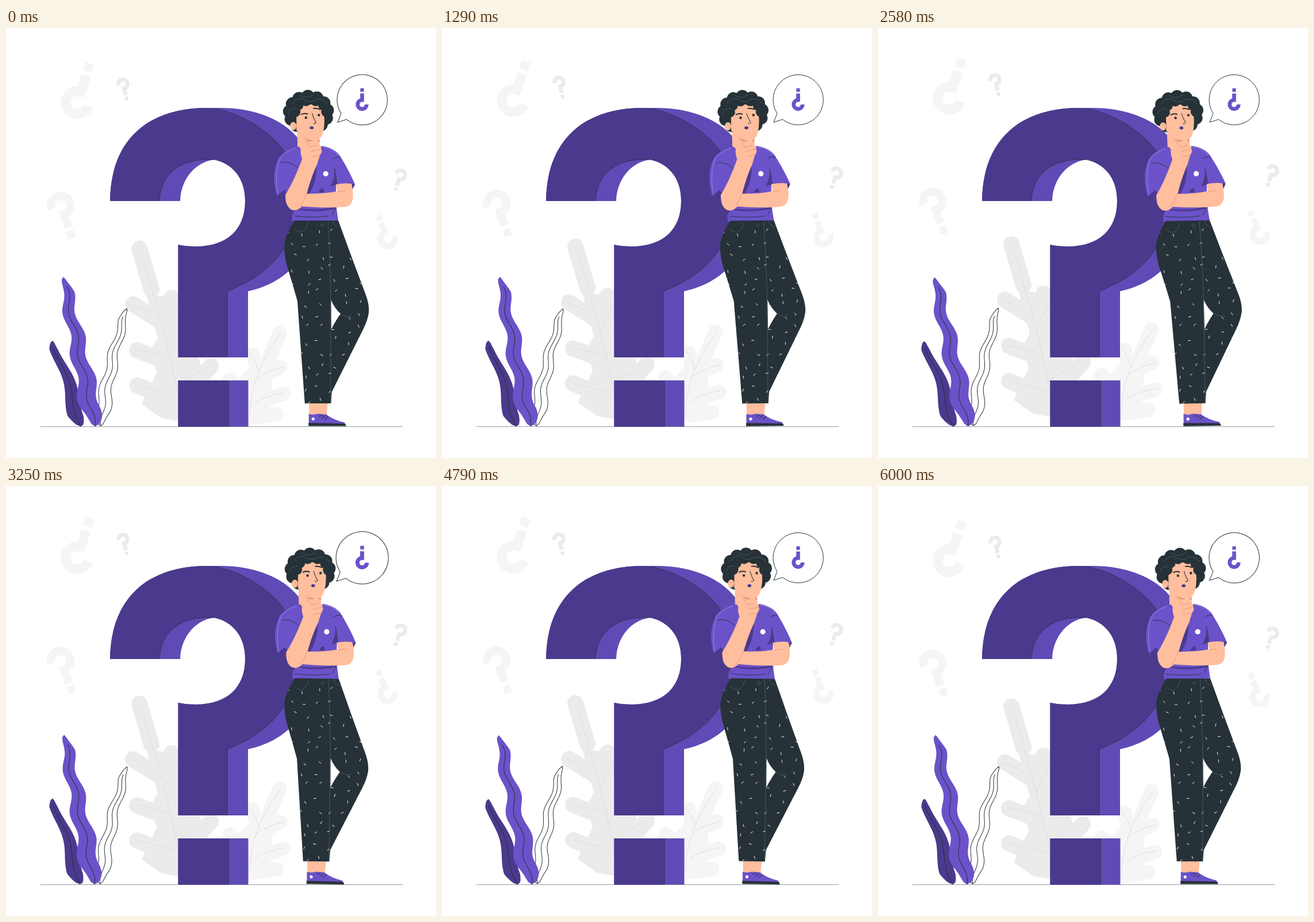
An HTML page that plays this animation: 748x748 px, repeating every 6040 ms.

```html
<!DOCTYPE html>
<html lang="en">
<head>
<meta charset="utf-8">
<title>Thinking</title>
<style>
html, body { margin: 0; width: 100%; height: 100%; overflow: hidden; background: #fff; }
svg { display: block; width: 100vw; height: 100vh; }
.main { fill: #6b52c9; }
.deep { fill: #4b398d; }
.side { fill: #604ab5; }
.ink { fill: #263238; }
.skin { fill: #ffbe9d; }
.line { fill: none; stroke: #263238; }
.crease { fill: none; stroke: #e58f70; stroke-width: .8; }
.seam { fill: none; stroke: #4a5c66; stroke-width: .9; }
.vein { fill: none; stroke: #dedede; }
.pale { fill: #f5f5f5; color: #f5f5f5; }
.grey { fill: #ebebeb; color: #ebebeb; }
.lobes { stroke: currentColor; stroke-linecap: round; }
.outline { fill: #fff; stroke: #263238; }
</style>
</head>
<body>
<svg viewBox="0 0 748 748">
<defs>
  <g id="ask">
    <path d="M-20,0A20,20 0 1 1 0,20V49" fill="none" stroke="currentColor" stroke-width="17"/>
    <path d="M-8,56.5H8V72H-8Z" fill="currentColor"/>
  </g>
  <clipPath id="cloth"><use href="#trousers" clip-rule="evenodd"/></clipPath>
</defs>

<g id="floating">
  <!-- lobed leaves: a body with thick rounded strokes -->
  <g class="grey">
    <path d="M238,440L260,466L300,470L340,590L310,686L270,679L236,655L262,600L252,560L264,540Z"/>
    <path class="lobes" stroke-width="28" d="M232,384L253,455M221,481L272,513M288,470L280,540M228,561L290,585M228,622L300,652M356,589L310,640"/>
  </g>
  <path class="vein" d="M239,405Q262,480 276,535T302,650M218,482Q250,492 266,508M300,487Q284,505 276,535M225,560Q262,565 288,578M230,622Q270,632 296,640M355,588L296,622"/>
  <g class="pale">
    <path d="M441,573L465,571L463,612L458,684L420,691L385,632L415,600Z"/>
    <path class="lobes" stroke-width="25" d="M476,532L455,580M477,590L440,608M482,637L440,650M470,672L432,678M429,568L438,600M389,612L425,645"/>
  </g>
  <path class="vein" d="M478,532Q450,570 437,605T424,675M424,565Q438,585 439,598M483,590Q455,596 436,610M484,635Q450,640 430,655"/>
  <g class="pale">
    <use href="#ask" transform="translate(124,130) rotate(198)"/>
    <use href="#ask" transform="translate(95,309) rotate(-20) scale(.84)"/>
    <use href="#ask" transform="translate(664,367.5) rotate(158) scale(.62)"/>
  </g>
  <g class="grey">
    <use href="#ask" transform="translate(203.5,98) rotate(-14) scale(.4)"/>
    <use href="#ask" transform="translate(686.5,256) rotate(19) scale(.4)"/>
  </g>
</g>

<path d="M60,693.5H690" stroke="#263238" stroke-width=".8" opacity=".6"/>

<!-- large question mark -->
<path class="side" d="M181,301C182,196 245,139 350,139L375,139C425,139 475,155 504,187C532,215 540,270 535,310C535,400 485,444 421,458V573H299.500V377C308,379 318,380 330,380C385,380 416,350 416,301C416,262 395,236 362,229C330,233 304,262 303,301ZM299.500,613H421.500V693.500H299.500Z"/>
<path class="deep" d="M181,301C182,196 245,139 350,139L363,140C440,156 510,215 510,290C510,365 470,425 385,458V573H299.500V377C308,379 318,380 330,380C385,380 416,350 416,301C416,262 395,236 362,229C295,225 268,262 267,301ZM299.500,613H387V693.500H299.500Z"/>
<path class="line" stroke-width=".8" d="M363,140C440,156 510,215 510,290C510,365 470,425 385,458V573M267,301C268,262 295,225 362,229M387,613V693"/>

<g id="plant"></g>

<!-- thinker -->
<g id="person">
  <path class="skin" d="M527,650H560L558,676H528ZM506,172L507,212Q528,222 546,209L545,185Z"/>
  <path class="main" d="M527,671Q535,674 542,671L557,672Q570,682 589,686L591,690H527Z"/>
  <path class="ink" d="M526.500,687L588,688Q592,689 592,692.500H526.500Z"/>
  <circle cx="534.500" cy="680" r="2.600" fill="#fff"/>
  <path class="line" d="M544,676L551,673M549,679L556,674M555,681L561,676"/>

  <path class="main" d="M502,207Q477,217 472,231Q461,258 471,292L488,290L502,302V317Q495,326 498,336H578L574,308L574,272L607,272Q596,247 583,226Q574,209 549,205Q542,214 528,214Q514,214 509,206Z"/>
  <path class="deep" d="M471,292Q481,295 488,287L484,281ZM502,313Q540,319 574,311L575,314Q540,323 502,315ZM540,240Q540,268 528,288H519ZM543,286Q547,278 552,279L553,286ZM571,245Q572,262 564,276L575,272ZM601,271L607,272L602,282Z"/>
  <path class="line" stroke-width=".9" d="M478,234Q493,231 507,243M568,228Q576,222 582,226M571,244Q575,258 575,272M501,327Q535,331 562,327M572,315L567,326"/>
  <path d="M503,209Q478,218 474,233Q467,258 473,288M550,207Q569,209 577,221" fill="none" stroke="#b5a8e4" stroke-width=".6"/>
  <circle cx="556" cy="253.500" r="4.600" fill="#fff"/>

  <path class="skin" d="M574,272Q588,269 601,271Q605,288 603,298Q601,309 591,311Q557,314 510,310L520,288Q553,289 576,284Z"/>
  <path class="skin" d="M516,225L542,235C532,256 524,282 520,302Q510,321 496,316Q485,309 486,290C497,272 507,250 516,225Z"/>
  <path class="crease" d="M522,287Q518,303 510,311M577,285L590,283"/>

  <path id="trousers" class="ink" fill-rule="evenodd" d="M502,335H578L600,395L624,459Q633,481 631,496Q629,509 622,523L567,633L565.500,653H520L507,475Q499,447 488,411Q482,386 485,371Q489,354 502,335ZM565.500,473Q571,487 582,497Q573,510 566,524Z"/>
  <g id="specks" clip-path="url(#cloth)" stroke="#fff" stroke-width=".9"></g>
  <path class="seam" d="M560,336Q564,400 565,474V650M501,349Q518,365 526,338M582,497Q592,504 601,501M569,336Q571,345 580,347"/>
  <circle class="seam" cx="550" cy="343" r="2.500"/>

  <!-- head -->
  <g id="hairBack" class="ink"><ellipse cx="526" cy="147" rx="36" ry="32"/></g>
  <path class="skin" d="M505,150L512,133H548L553,151Q555,168 551,183Q547,196 535,196Q519,193 510,183L505,178Z"/>
  <ellipse class="skin" cx="499.500" cy="170.500" rx="5.500" ry="7"/>
  <path class="crease" d="M497,168Q502,168 503,174"/>
  <g id="hairFront" class="ink"></g>
  <path class="seam" d="M498,131Q505,119 517,124Q528,132 540,124Q552,121 559,132M510,116Q522,125 535,116M490,149Q495,138 505,140"/>
  <path d="M513,151Q518,147 525,150M534,140Q540,139 547,142" fill="none" stroke="#263238" stroke-width="2"/>
  <circle class="ink" cx="521.500" cy="156" r="2.200"/>
  <circle class="ink" cx="544" cy="151.500" r="2.200"/>
  <path class="line" d="M532,148Q535,158 539,164Q538,167 534,166"/>
  <ellipse class="deep" cx="531.500" cy="173.500" rx="3.400" ry="2.600"/>
  <path d="M521,192Q533,198 545,194V198L525,197Z" fill="#e9936f"/>
  <path class="skin" d="M513,187Q516,182 519,188L525,202Q532,196 538,194Q543,194 543,199L542,204Q549,204 548,210Q551,215 546,221L541,237L515,228Q510,216 514,204Z"/>
  <path class="crease" d="M525,202L529,207L542,204M530,215L547,211M531,224L545,221M518,190L525,202"/>
</g>

<!-- speech bubble -->
<g id="bubble">
  <path d="M583,148.500A43.600,43.600 0 1 1 592.500,159L577,164Z" class="outline"/>
  <use href="#ask" color="#6b52c9" transform="translate(619.5,133) rotate(180) scale(.39)"/>
</g>
</svg>

<script>
const $ = id => document.getElementById(id);
const TURN = 2 * Math.PI;

// Wavy leaf from tip to base; its width grows downwards and closes at both ends.
function blade({ tip, base, width, bow, wave, count, shift, fill }) {
  const left = [], right = [], rib = [];
  for (let i = 0; i <= 60; i++) {
    const s = i / 60;
    const y = tip[1] + (base[1] - tip[1]) * s;
    const ends = Math.sqrt(Math.min(1, 10 * s, 8 * (1 - s)));
    const x = tip[0] + (base[0] - tip[0]) * s + bow * 4 * s * (1 - s)
      + wave * ends * Math.sin(TURN * (count * s + shift));
    const half = width * (.65 + .85 * s) * ends;
    left.push([x - half, y]);
    right.unshift([x + half, y]);
    if (i > 3) rib.push([x, y]);
  }
  return `<path class="${fill}" d="M${left.concat(right).join('L')}Z"/>
    <path class="line" d="M${rib.join('L')}"/>`;
}
$('plant').innerHTML =
  blade({ tip: [210, 488], base: [165, 692], width: 8.5, bow: -5, wave: 3, count: 3.3, shift: .53, fill: 'outline' }) +
  blade({ tip: [81, 544], base: [130, 693], width: 10, bow: 2, wave: 4, count: 1.3, shift: .64, fill: 'deep' }) +
  blade({ tip: [100, 433], base: [155, 693], width: 12.5, bow: 0, wave: 4.5, count: 3.5, shift: -.115, fill: 'main' });

// Curls sit on an arc, angles in degrees.
function curls(id, cx, cy, rx, ry, r, from, to, step) {
  for (let a = from; a <= to; a += step) {
    const rad = a * TURN / 360;
    $(id).innerHTML += `<circle cx="${cx + rx * Math.cos(rad)}" cy="${cy + ry * Math.sin(rad)}" r="${r}"/>`;
  }
}
curls('hairBack', 526, 147, 33, 28, 11.5, 128, 412, 28);
curls('hairFront', 530, 146, 27, 20, 9, 180, 360, 36);

// Scattered specks, kept inside the trousers by the clip path.
let seed = 11;
const random = () => (seed = seed * 16807 % 2147483647) / 2147483647;
for (let y = 348; y < 645; y += 21) {
  for (let x = 490; x < 635; x += 24) {
    const px = x + 14 * random(), py = y + 14 * random();
    $('specks').innerHTML += `<path d="M-2.500,0H2.500" transform="translate(${px},${py}) rotate(${180 * random()})"/>`;
  }
}

const phase = (t, period) => t % period / period;
const sway = p => p < .25 ? 4 * p : p < .75 ? 2 - 4 * p : 4 * p - 4;
const peak = p => Math.max(0, 1 - Math.abs(2 * p - 1));
const set = (id, value) => $(id).setAttribute('transform', value);

function draw() {
  const t = performance.now() % 6040 + 20;
  const beat = 1 + .1 * peak(phase(t, 3000) / .4);
  set('floating', `translate(0,${-15 * peak(phase(t, 1500))})`);
  set('person', `rotate(${sway(phase(t, 1500))},548,400)`);
  set('plant', `rotate(${1.3 * sway(phase(t, 3000))},146,563)`);
  set('bubble', `translate(619.7,124.5) scale(${beat}) translate(-619.7,-124.5)`);
  requestAnimationFrame(draw);
}
draw();
</script>
</body>
</html>
```
